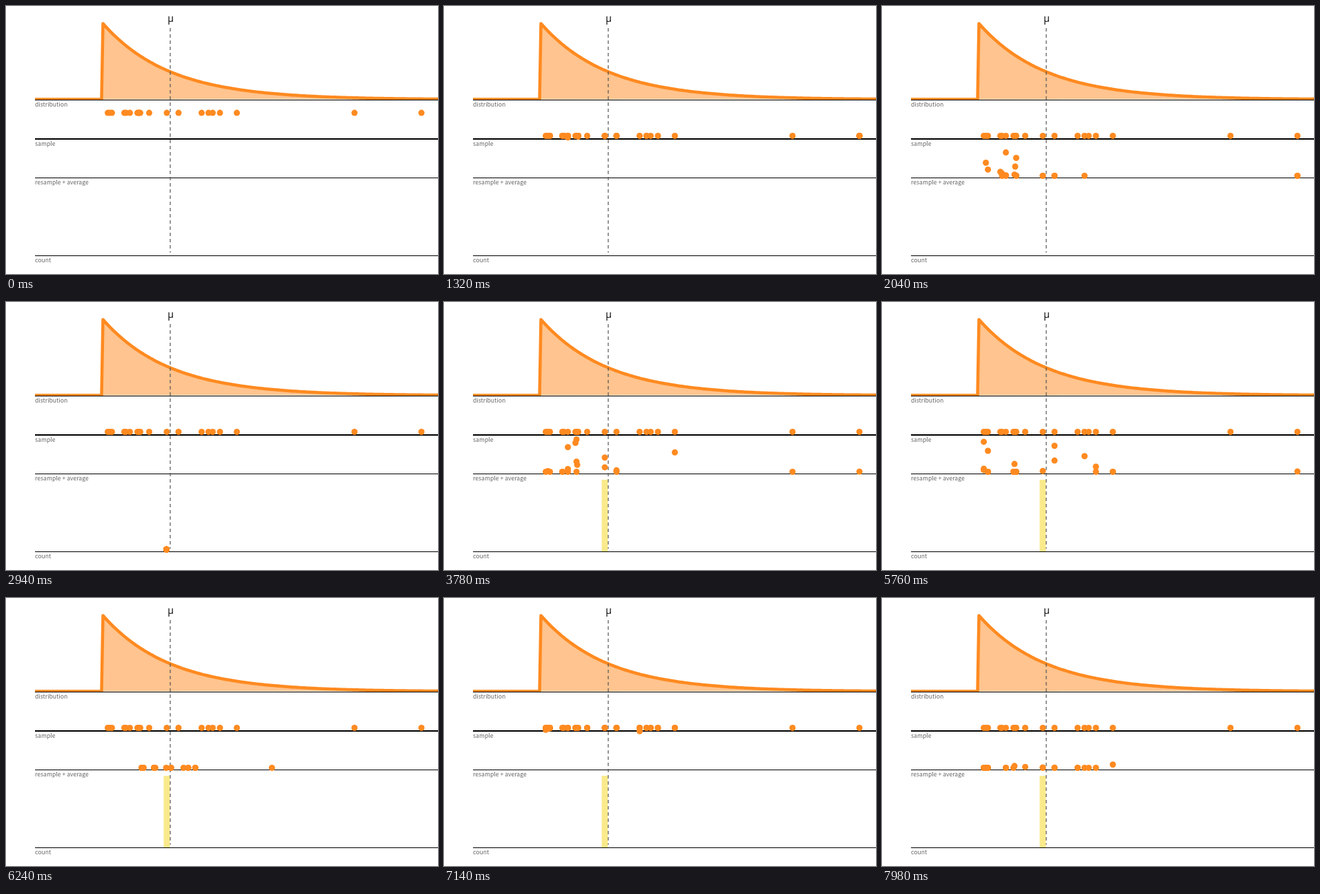
An HTML page for the animation above (8000 ms loop, 626 by 389 pixels).

```html
<!DOCTYPE html>
<html lang="en">
<head>
<meta charset="utf-8">
<title>Bootstrap resampling</title>
<style>
  html, body { margin: 0; width: 100%; height: 100%; overflow: hidden; background: #fff; }
  svg { display: block; }
  .label { font: 8.65px "Noto Sans CJK JP", "Noto Sans CJK SC", "Open Sans", sans-serif; fill: #666; }
  .mu { font: 14px "Open Sans", "Noto Sans", sans-serif; text-anchor: middle; }
  .dot { fill: #ff8a20; }
</style>
</head>
<body>
<svg width="626" height="389" viewBox="0 0 626 389">
  <clipPath id="plot"><path d="M42 0H626V136.2H42Z"/></clipPath>
  <path id="curve" clip-path="url(#plot)" fill="#ff8a20" fill-opacity=".5" stroke="#ff8a20" stroke-width="4.5" stroke-linejoin="round"/>
  <path d="M42 136.5H626M42 249.5H626M42 362.5H626" stroke="#000"/>
  <path d="M42 193H626" stroke="#000" stroke-width="1.8"/>
  <rect id="bar" x="228.5" y="258" width="9" height="104" fill="#faea8c"/>
  <path d="M238 32V358" stroke="#555" stroke-width="1.2" stroke-dasharray="5 4"/>
  <text class="mu" x="238.7" y="22.5">μ</text>
  <text class="label" x="42" y="146">distribution</text>
  <text class="label" x="42" y="203">sample</text>
  <text class="label" x="42" y="259">resample + average</text>
  <text class="label" x="42" y="372">count</text>
  <g id="dots"></g>
</svg>
<script>
const LOOP = 8000, DROP = 620, STAGGER = 29.5;
const MERGE = 1180, SINK = 1380, DONE = 1780;
const SOURCE_Y = 131.5, SAMPLE_Y = 188.5, RESAMPLE_Y = 246.5, COUNT_Y = 359.5;

const sample = [147.5, 150.5, 153.5, 171.5, 174, 179.5, 190.5, 192, 193, 194.5,
  207.5, 233, 250, 283.5, 293.5, 299.5, 310, 334.5, 505, 602];

// Each pick is an index into the sample, in the order the dots drop
const rounds = [
  { start: 1189, mean: 232.5, picks: [5, 9, 11, 12, 14, 19, 4, 12, 11, 19, 9, 5, 7, 4, 3, 2, 8, 1, 9, 5] },
  { start: 2996, mean: 233, picks: [0, 2, 3, 5, 7, 12, 18, 3, 19, 1, 12, 5, 11, 8, 7, 11, 17, 5, 6, 7] },
  { start: 4955, mean: 231.5, picks: [9, 16, 2, 6, 17, 2, 6, 9, 17, 19, 11, 0, 0, 16, 7, 12, 14, 2, 12, 0] },
  { start: 6970, mean: 231.5, picks: [13, 0, 1, 2, 5, 6, 11, 12, 14, 15, 16, 13, 0, 2, 5, 12, 11, 10, 7, 17] },
];

const byId = id => document.getElementById(id);
const lerp = (a, b, p) => a + (b - a) * p;
const ease = t => {
  t = Math.min(1, Math.max(0, t));
  return t < .5 ? 4 * t ** 3 : 1 - 4 * (1 - t) ** 3;
};

function makeDot() {
  const dot = document.createElementNS("http://www.w3.org/2000/svg", "circle");
  dot.setAttribute("class", "dot");
  dot.setAttribute("r", 4.5);
  return byId("dots").appendChild(dot);
}

function place(dot, x, y) {
  dot.setAttribute("cx", x);
  dot.setAttribute("cy", y);
}

let outline = "M30 135.5H138.5";
for (let x = 140.5; x < 640; x += 3) {
  outline += `L${x} ${135.8 - 110.3 * Math.exp((140.5 - x) / 97)}`;
}
byId("curve").setAttribute("d", outline);

const sampleDots = sample.map(makeDot);
const resampleDots = sample.map(makeDot);

function draw(time) {
  const sampleY = lerp(SOURCE_Y, SAMPLE_Y, ease((time + 290) / DROP));
  sampleDots.forEach((dot, i) => place(dot, sample[i], sampleY));

  const round = rounds.find(r => time >= r.start && time < r.start + DONE);
  resampleDots.forEach((dot, i) => {
    dot.style.display = round ? "" : "none";
    if (!round) return;
    const age = time - round.start;
    const drop = ease((age - i * STAGGER) / DROP);
    const merge = ease((age - MERGE) / (SINK - MERGE));
    const sink = ease((age - SINK) / (DONE - SINK));
    place(dot, lerp(sample[round.picks[i]], round.mean, merge),
      lerp(lerp(SAMPLE_Y, RESAMPLE_Y, drop), COUNT_Y, sink));
  });

  byId("bar").style.display = time >= rounds[0].start + DONE ? "" : "none";
}

function tick() {
  draw(performance.now() % LOOP);
  requestAnimationFrame(tick);
}
tick();
</script>
</body>
</html>
```
